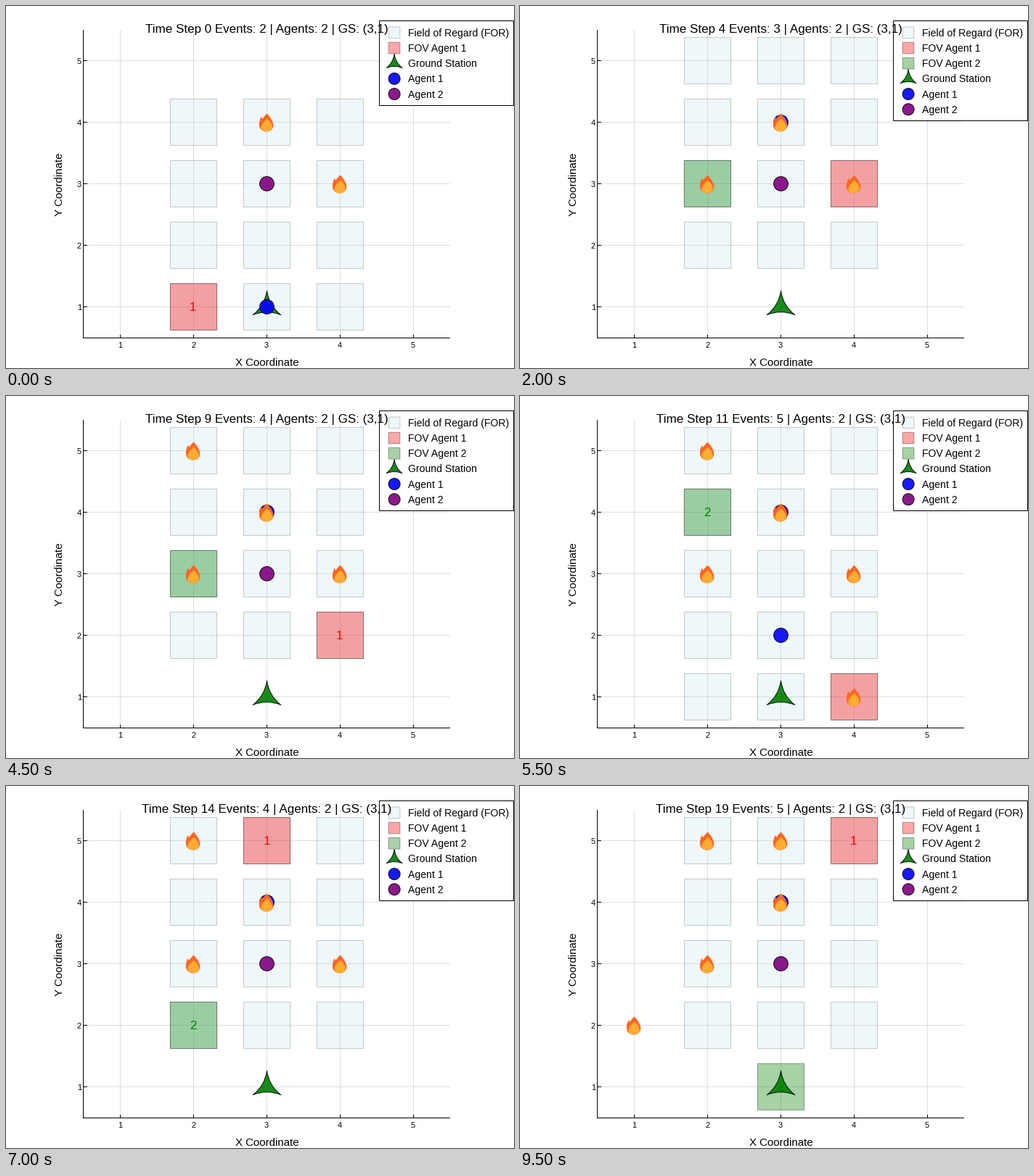
Animation, 700 px wide and 500 px high, one loop 10 s. Source, as a matplotlib script:

```python
import numpy as np
import matplotlib.pyplot as plt
from matplotlib.animation import FuncAnimation
from matplotlib.patches import Circle, PathPatch, Polygon, Rectangle
from matplotlib.path import Path

WIDTH, HEIGHT, DPI = 700, 500, 100
PX = 72 / DPI
STEPS, STEP_MS = 20, 500

RED, GREEN, BLUE, PURPLE = (1, 0, 0), (0, 0.5, 0), (0, 0, 1), (0.5, 0, 0.5)
SKY = (173 / 255, 216 / 255, 230 / 255)
FOR_ALPHA, FOV_ALPHA, MARKER_ALPHA = 0.2, 0.35, 0.9
STATION = (3, 1)

# Cells each agent's view passes, keyed by step; it slews between them
VIEW_KEYS = (
    {0: (2, 1), 2: (3, 3), 6: (4, 3), 11: (4, 1), 14: (3, 5), 16: (2, 2),
     19: (4, 5)},
    {2: (2, 2), 3: (2, 3), 6: (3, 2), 11: (2, 4), 14: (2, 2), 16: (2, 2),
     19: (3, 1)},
)
VIEW_COLORS = (RED, GREEN)

# Steps during which each cell holds an event
EVENTS = {
    (3, 4): range(STEPS), (4, 3): range(16), (2, 3): range(4, STEPS),
    (2, 5): range(9, STEPS), (4, 1): range(10, 14), (5, 2): range(17, 19),
    (3, 5): range(18, STEPS), (1, 2): range(19, STEPS),
}

plt.rcParams.update({"font.family": "Liberation Sans", "path.snap": False})
fig = plt.figure(figsize=(WIDTH / DPI, HEIGHT / DPI), dpi=DPI, facecolor="white")
ax = fig.add_axes([0, 0, 1, 1])


def to_px(cell):
    return 359.5 + 101 * (cell[0] - 3), 245.5 - 85 * (cell[1] - 3)


def agent_rows(step):
    phase = step % 5
    return 1 + phase - phase // 3, (phase + 2) % 4 + 1


def view_cell(keys, step):
    steps = list(keys)
    if step < steps[0]:
        return None
    return tuple(round(np.interp(step, steps, axis))
                 for axis in zip(*keys.values()))


def line(xs, ys, alpha=1.0):
    ax.plot(xs, ys, color="black", alpha=alpha, lw=PX, zorder=1,
            solid_capstyle="butt")


def label(x, y, text, size, ha="center", **style):
    ax.text(x, y, text, fontsize=size * PX, ha=ha, va="baseline", **style)


def add(shape, color, alpha):
    shape.set(facecolor=(*color, alpha), edgecolor=(0, 0, 0, alpha),
              linewidth=PX, zorder=2)
    ax.add_patch(shape)


def square(center, half, color, alpha):
    x, y = center
    add(Rectangle((x - half, y - half), 2 * half, 2 * half), color, alpha)


def disc(center, radius, color):
    add(Circle(center, radius), color, MARKER_ALPHA)


def station(center, radius):
    # Three tips joined by curves that bend in towards the centre
    angles = np.arange(7) * np.pi / 3
    radii = radius * np.where(np.arange(7) % 2, 0.14, 1)
    points = np.column_stack([radii * np.sin(angles), -radii * np.cos(angles)])
    codes = [Path.MOVETO] + [Path.CURVE3] * 6
    add(PathPatch(Path(points + center, codes), joinstyle="round"),
        GREEN, MARKER_ALPHA)


def drop(center, dx, dy, width, height, lean, color):
    t = np.linspace(0, 2 * np.pi, 60)
    x = dx + width * np.sin(t) * np.sin(t / 2) + lean * (1 + np.cos(t)) / 2
    y = dy - height * np.cos(t)
    ax.add_patch(Polygon(np.column_stack([x, y]) + center, facecolor=color,
                         lw=0, zorder=4))


def flame(center):
    drop(center, -0.8, 0.5, 12.1, 12.5, 0.8, "#ff6622")
    drop(center, -6, 1.5, 5, 9, -2, "#ff6622")
    drop(center, -0.8, 4, 10, 8.8, 1.2, "#ffac33")


def draw_axes():
    for n in range(1, 6):
        x, y = to_px((n, n))
        line([x, x], [33, 458], alpha=0.13)
        line([107, 612], [y, y], alpha=0.13)
        line([x, x], [454, 458])
        line([107, 112], [y, y])
        label(x - 0.5, 472, str(n), 11)
        label(104, y + 4.5, str(n), 11, ha="right")
    line([106.5, 106.5], [33, 459])
    line([106, 612], [458.5, 458.5])
    label(359.4, 497, "X Coordinate", 15)
    label(78, 246, "Y Coordinate", 15, rotation=90, rotation_mode="anchor")


def draw_legend(show_second):
    entries = [("Field of Regard (FOR)", square, (7.8, SKY, FOR_ALPHA)),
               ("FOV Agent 1", square, (7.8, RED, FOV_ALPHA)),
               ("FOV Agent 2", square, (7.8, GREEN, FOV_ALPHA)),
               ("Ground Station", station, (12.7,)),
               ("Agent 1", disc, (8, BLUE)),
               ("Agent 2", disc, (8, PURPLE))]
    if not show_second:
        del entries[2]
    height = 10.8 + 21.2 * len(entries)
    add(Rectangle((514.5, 20.5), 185, round(height)), (1, 1, 1), 1)
    for i, (text, marker, args) in enumerate(entries):
        y = 36.8 + 21.2 * i
        marker((535.1, y), *args)
        label(554.5, y + 5, text, 14, ha="left")


def draw(step):
    ax.clear()
    ax.set(xlim=(0, WIDTH), ylim=(HEIGHT, 0))
    ax.axis("off")
    draw_axes()

    rows = agent_rows(step)
    for row in range(1, 6):
        if any(abs(row - r) <= 1 for r in rows):
            for col in (2, 3, 4):
                square(to_px((col, row)), 32.1, SKY, FOR_ALPHA)

    cells = [view_cell(keys, step) for keys in VIEW_KEYS]
    views = [(to_px(cell), color, str(i))
             for i, (cell, color) in enumerate(zip(cells, VIEW_COLORS), 1) if cell]
    for center, color, _ in views:
        square(center, 32.1, color, FOV_ALPHA)

    station(to_px(STATION), 22.3)
    for row, color in zip(rows, (BLUE, PURPLE)):
        disc(to_px((3, row)), 9.9, color)
    for (x, y), color, number in views:
        label(x - 0.5, y + 5.5, number, 17, color=color, zorder=3)

    active = [cell for cell, steps in EVENTS.items() if step in steps]
    for cell in active:
        flame(to_px(cell))

    draw_legend(len(views) == 2)
    label(359.5, 37, f"Time Step {step} Events: {len(active)} | Agents: 2 | "
          f"GS: ({STATION[0]},{STATION[1]})", 17, zorder=5)
    return ax.get_children()


anim = FuncAnimation(fig, draw, frames=STEPS, interval=STEP_MS,
                     repeat=True, repeat_delay=0, init_func=lambda: draw(0))
plt.show()
```
